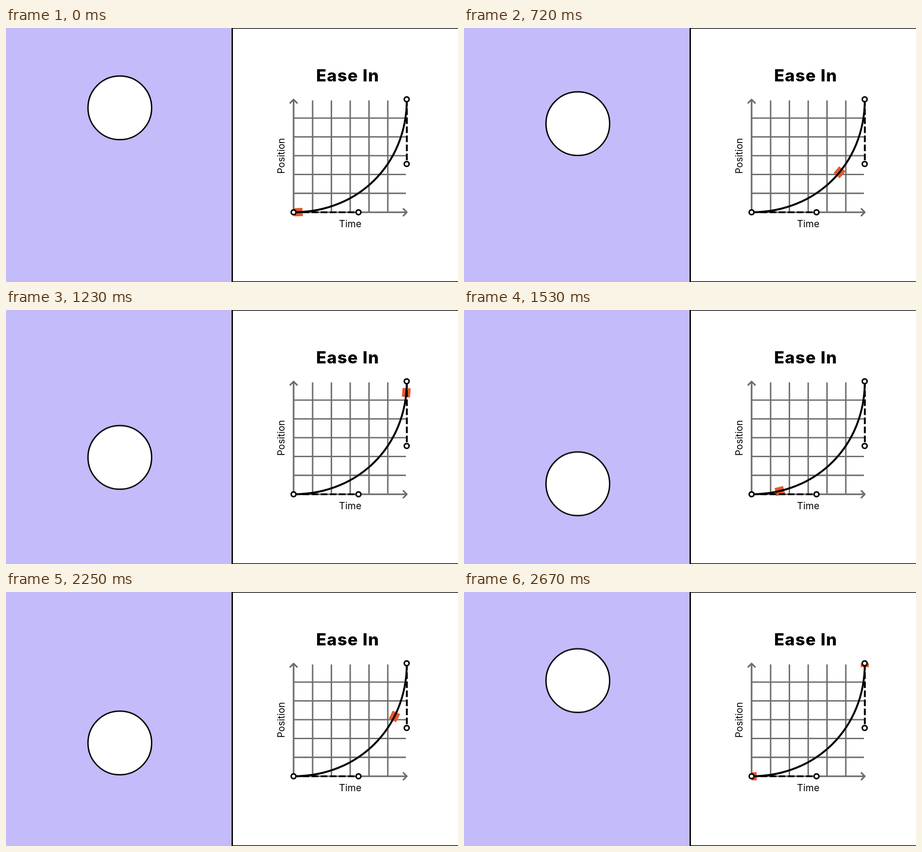
Animation, 998 px wide and 561 px high, one loop 2.7 s. Source, as an HTML page:

```html
<!DOCTYPE html>
<html lang="en">
<head>
<meta charset="utf-8">
<title>Ease In</title>
<style>
  html, body { margin: 0; width: 100%; height: 100%; overflow: hidden; background: #fff; }
  svg { display: block; width: 998px; height: 561px; }
  text { font-family: Inter, sans-serif; font-size: 21px; text-anchor: middle; }
  .title { font-size: 37px; font-weight: 800; letter-spacing: 1.4px; }
  .line { fill: none; stroke: #000; stroke-width: 4.2; }
  .grid { fill: none; stroke: #6d6e70; stroke-width: 3.2; }
  .arrow { stroke-width: 3.6; stroke-linecap: round; stroke-linejoin: round; }
  .handle { stroke-dasharray: 14.5 5.5; }
  .knobs { fill: #fff; stroke: #000; stroke-width: 3.4; }
  .ball {
    fill: #fff; stroke: #000; stroke-width: 3;
    animation: bounce 2700ms -24ms infinite;
  }
  .marker {
    fill: none; stroke: #e2582f; stroke-width: 18;
    stroke-dasharray: 5 95;
    animation: travel 1350ms linear infinite;
  }
  /* Eases in both ways, with a short rest at the bottom. */
  @keyframes bounce {
    0% { transform: translateY(0); animation-timing-function: cubic-bezier(.573, 0, 1, .427); }
    48.3% { transform: translateY(209px); animation-timing-function: linear; }
    51.44% { transform: translateY(209px); animation-timing-function: cubic-bezier(.573, 0, 1, .427); }
    100% { transform: translateY(0); }
  }
  /* The dash pattern is as long as the path, so the marker wraps around. */
  @keyframes travel {
    from { stroke-dashoffset: 0; }
    to { stroke-dashoffset: -100; }
  }
</style>
</head>
<body>
<svg viewBox="0 0 998 561">
  <defs>
    <path id="curve" d="M635 407C778 407 885 300 885 157.5" pathLength="100"/>
  </defs>

  <rect width="498" height="561" fill="#c4bbfa"/>
  <path d="M498 0H998V1.6H501V559.4H998V561H498Z"/>
  <circle class="ball" cx="251.3" cy="176.3" r="70.3"/>

  <text class="title" x="754.5" y="118">Ease In</text>
  <text x="760" y="440">Time</text>
  <text transform="translate(615 282.5) rotate(-90)">Position</text>

  <path class="grid" d="M677 160V407M718.5 160V407M760 160V407M801.5 160V407M843 160V407
    M635 199H883M635 240.5H883M635 282H883M635 323.5H883M635 365.2H883"/>
  <path class="grid arrow" d="M635 407V158M627.5 165.5L635 158L642.5 165.5
    M635 407H885M877.5 399.5L885 407L877.5 414.5"/>

  <use class="marker" href="#curve"/>
  <path class="line handle" d="M635 407H778"/>
  <path class="line handle" d="M885 157.5V300"/>
  <use class="line" href="#curve"/>
  <g class="knobs">
    <circle cx="635" cy="407" r="5.3"/>
    <circle cx="778.3" cy="407" r="5.3"/>
    <circle cx="884.7" cy="157.5" r="5.3"/>
    <circle cx="884.7" cy="300.3" r="5.3"/>
  </g>
</svg>
</body>
</html>
```
